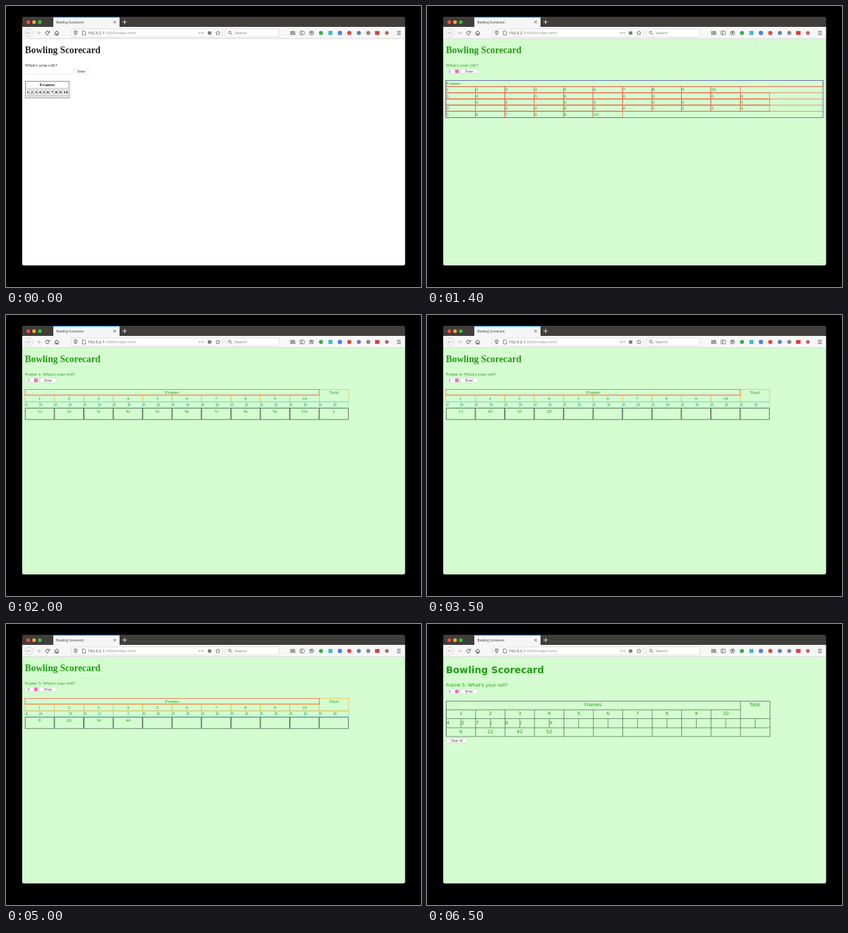
An HTML page with a canvas that plays this animation: 614 by 417 pixels, repeating every 8 s.

```html
<!DOCTYPE html>
<html lang="en">
<head>
<meta charset="utf-8">
<title>Bowling Scorecard</title>
<style>
html, body { margin: 0; width: 614px; height: 417px; overflow: hidden; background: #000; }
canvas { display: block; }
</style>
</head>
<body>
<canvas id="stage" width="614" height="417"></canvas>
<script>
const c = document.getElementById('stage').getContext('2d');
const SERIF = '"Liberation Serif", Times, serif';
const WIDE = '"DejaVu Sans", Verdana, sans-serif';
const UI = '"Open Sans", sans-serif';
const GREEN = '#239b12', MINT = '#d4fcd0', RED = '#f0604a', ORANGE = '#f0bd48', CYAN = '#83dfd9', DARK = '#56705a';
const LEFT = 28, COL = 43.54;
const colX = i => LEFT + i * COL;

function rect(x, y, w, h, fill) {
  c.fillStyle = fill;
  c.fillRect(x, y, w, h);
}
function box(x, y, w, h, color, width = 0.8) {
  c.strokeStyle = color;
  c.lineWidth = width;
  c.strokeRect(x, y, w, h);
}
function round(x, y, w, h, r, fill, stroke) {
  c.beginPath();
  c.roundRect(x, y, w, h, r);
  if (fill) { c.fillStyle = fill; c.fill(); }
  if (stroke) { c.strokeStyle = stroke; c.lineWidth = 0.7; c.stroke(); }
}
function dot(x, y, r, fill) {
  c.beginPath();
  c.arc(x, y, r, 0, 7);
  c.fillStyle = fill;
  c.fill();
}
function ring(x, y, r, color, width = 0.9, from = 0, to = 7) {
  c.beginPath();
  c.arc(x, y, r, from, to);
  c.strokeStyle = color;
  c.lineWidth = width;
  c.stroke();
}
function line(color, width, ...p) {
  c.beginPath();
  for (let i = 0; i < p.length; i += 2) c.lineTo(p[i], p[i + 1]);
  c.strokeStyle = color;
  c.lineWidth = width;
  c.stroke();
}
function text(s, x, y, font, color, align = 'left') {
  c.font = font;
  c.fillStyle = color;
  c.textAlign = align;
  c.fillText(s, x, y);
}

function drawTabs() {
  rect(24, 16, 567, 15, '#403e3b');
  ['#fb4c42', '#f5ad30', '#35c13c'].forEach((k, i) => dot(33 + i * 8.5, 24, 2.7, k));
  rect(70, 16, 98, 15, '#f6f6f7');
  rect(70, 16, 98, 1.3, '#2d8df5');
  text('Bowling Scorecard', 74.5, 25.7, '4.7px ' + UI, '#333');
  line('#444', 0.8, 158.8, 22, 162.6, 25.8);
  line('#444', 0.8, 162.6, 22, 158.8, 25.8);
  line('#ddd', 1, 172.3, 23.8, 178.7, 23.8);
  line('#ddd', 1, 175.5, 20.6, 175.5, 27);
}

function drawToolbar() {
  const ink = '#555';
  rect(24, 31, 567, 18, '#f7f7f8');
  rect(24, 48, 567, 0.8, '#d2d2d4');
  ring(34, 40, 5.8, '#c8c8ca', 0.7);
  line('#bbb', 0.9, 33.7, 37.5, 31.2, 40, 33.7, 42.5);
  line('#bbb', 0.9, 31.2, 40, 37, 40);
  line('#bbb', 0.9, 48.3, 37.5, 50.8, 40, 48.3, 42.5);
  line('#bbb', 0.9, 45, 40, 50.8, 40);
  ring(61.3, 40, 2.6, ink, 1, 0.5, 5.5);
  line(ink, 1, 64.4, 36.8, 64.4, 39.3, 61.8, 39.3);
  line(ink, 1, 71.7, 40.2, 75, 37, 78.3, 40.2);
  line(ink, 1, 72.8, 39.7, 72.8, 43, 77.2, 43, 77.2, 39.7);
  rect(74.3, 41, 1.5, 2, ink);

  round(97, 34, 223, 12, 1.5, '#fff', '#d0d0d2');
  line(ink, 0.8, 100.7, 37.4, 103, 36.8, 105.3, 37.4, 105, 41, 103, 43, 101, 41, 100.7, 37.4);
  line(ink, 0.8, 103, 37, 103, 42.6);
  line(ink, 0.8, 113, 37, 116, 37, 117.7, 38.7, 117.7, 43, 113, 43, 113, 37);
  text('192.0.2.1', 121, 42.2, '5.9px ' + UI, '#333');
  const hostEnd = 121 + c.measureText('192.0.2.1').width;
  text(':4300/index.html', hostEnd, 42.2, '5.9px ' + UI, '#8c8c8c');
  [286.3, 289.2, 292.1].forEach(x => dot(x, 40, 0.75, ink));
  rect(298.7, 37.7, 5, 4.8, '#777');
  c.beginPath();
  for (let i = 0; i < 10; i++) {
    const a = i * Math.PI / 5 - Math.PI / 2, r = i % 2 ? 1.6 : 3.5;
    c.lineTo(313.5 + r * Math.cos(a), 40.2 + r * Math.sin(a));
  }
  c.closePath();
  c.strokeStyle = ink;
  c.lineWidth = 0.7;
  c.stroke();

  round(325, 34, 79, 12, 1.5, '#fff', '#d0d0d2');
  ring(331, 39.3, 1.9, ink, 0.8);
  line(ink, 0.8, 332.4, 40.7, 334.8, 43);
  text('Search', 338, 42.2, '5.9px ' + UI, '#777');

  [421.5, 423.4, 425.3].forEach(x => line(ink, 1, x, 37, x, 43));
  line(ink, 1, 426.2, 37.2, 427.8, 43);
  round(435, 37.2, 6.3, 5.6, 1, null, ink);
  line(ink, 0.8, 437.4, 37.2, 437.4, 42.8);
  ring(452, 40, 2.9, ink);
  dot(452, 39.4, 1.2, ink);
  dot(466, 40, 3, '#35ae4d');
  rect(477, 37, 6, 6, '#43bfc3');
  dot(494, 40, 3.2, '#4a83ee');
  dot(508, 40, 3.1, '#df4940');
  dot(522, 40, 3, '#5c82b5');
  dot(536, 40, 3, '#88888a');
  rect(546, 37.2, 6.6, 5.6, '#d83c3c');
  dot(563.5, 40, 2.8, '#b9675d');
  [37.6, 40, 42.4].forEach(y => line(ink, 0.9, 578.5, y, 584, y));
}

function button(label, x, y, w) {
  round(x, y, w, 6.6, 1, '#fff', '#c6d8c4');
  text(label, x + w / 2, y + 5, '4.7px ' + UI, '#333', 'center');
}

function drawForm(y, roundStep) {
  round(29, y, 19, 6.6, 1, '#fff', '#c6d8c4');
  text('0', 32, y + 5, '4.7px ' + UI, '#333');
  if (roundStep) dot(44.2, y + 3.3, 2.7, '#ee46b2');
  else round(41.7, y + 0.8, 5, 5, 0.8, '#ee46b2');
  line('#fff', 0.6, 43.2, y + 2.7, 44.2, y + 1.8, 45.2, y + 2.7);
  line('#fff', 0.6, 43.2, y + 4, 44.2, y + 4.9, 45.2, y + 4);
  button('Enter', 50, y, 25);
}

function drawPage(bg, color, prompt, family = SERIF, drop = 0) {
  rect(24, 48.8, 567, 337, bg);
  text('Bowling Scorecard', LEFT, 70 + drop, 'bold 13.86px ' + family, color);
  text(prompt, LEFT, 90 + drop, '6.93px ' + family, color);
}

function plainScene() {
  const bold = 'bold 6.93px ' + SERIF, ink = '#222';
  drawPage('#fff', ink, "What's your roll?");
  line('#e2e2e2', 0.7, 28, 101.3, 98, 101.3);
  round(99, 93.8, 25, 7, 1, '#fff', '#e6e6e6');
  text('Enter', 111.5, 98.8, '4.7px ' + UI, ink, 'center');
  box(28.4, 111.4, 65.6, 25.4, '#999');
  box(29.7, 112.7, 63, 9.3, '#aaa', 0.6);
  text('Frames', 61, 119.4, bold, ink, 'center');
  for (let i = 0; i < 10; i++) {
    const x = 29.7 + i * 6.03, w = i < 9 ? 5 : 8.7;
    box(x, 123.2, w, 9.3, '#aaa', 0.6);
    text(i + 1, x + w / 2, 130.2, bold, ink, 'center');
    box(x, 133.8, w, 1.6, '#aaa', 0.6);
  }
}

function flowScene() {
  const font = '6.93px ' + SERIF, top = 110.5, rowH = 9.15;
  drawPage(MINT, GREEN, "What's your roll?");
  drawForm(93.7);
  const put = (s, col, row) => {
    box(colX(col), top + row * rowH, COL, rowH, RED, 0.75);
    text(s, colX(col) + 0.6, top + row * rowH + 6.8, font, GREEN);
  };
  box(LEFT, top, 558, rowH, RED, 0.75);
  text('Frames', LEFT + 0.6, top + 6.8, font, GREEN);
  for (let i = 0; i < 10; i++) put(i + 1, i, 1);
  for (let i = 0; i < 39; i++) {
    const s = i > 28 ? i - 28 : i % 3 == 2 && i < 26 ? '' : 0;
    put(s, i % 11, 2 + Math.floor(i / 11));
  }
  for (let r = 1; r < 6; r++) line(RED, 0.75, LEFT, top + r * rowH, 586, top + r * rowH);
  box(LEFT, top, 558, 55.2, '#6068b8', 0.9);
}

// Rolls are two marks per frame; an underscore is an empty half.
function gridScene(frame, rolls, scores) {
  const font = '6.93px ' + SERIF;
  drawPage(MINT, GREEN, `Frame ${frame}: What's your roll?`);
  drawForm(93.7);
  for (let i = 0; i < 11; i++) {
    const x = colX(i), mid = x + COL / 2;
    if (i < 10) {
      box(x, 119.2, COL, 9.4, ORANGE);
      text(i + 1, mid, 126.1, font, GREEN, 'center');
    }
    for (let h = 0; h < 2; h++) {
      const hx = x + h * COL / 2, mark = rolls[i * 2 + h] || '0';
      box(hx, 129.2, COL / 2, 8, CYAN, 0.7);
      if (mark != '_') text(mark, hx + 0.4, 135.3, font, GREEN);
    }
    box(x + 0.4, 138.3, COL - 0.8, 16.8, DARK, 0.9);
    text(scores[i] ?? '', mid, 144.5, font, GREEN, 'center');
  }
  box(colX(10), 110.4, COL, 18.2, ORANGE);
  text('Total', colX(10.5), 116.9, font, GREEN, 'center');
  box(LEFT, 110.4, COL * 10, 8.4, RED);
  text('Frames', colX(5), 116.9, font, GREEN, 'center');
}

function finalScene() {
  const font = '6.93px ' + WIDE, rolls = '427/6/_X', scores = [6, 22, 42, 52];
  drawPage(MINT, GREEN, "Frame 5: What's your roll?", WIDE, 2.6);
  drawForm(96.8, true);
  box(28.4, 114.4, COL * 11, 52.6, DARK);
  [127.3, 140.4, 154].forEach((y, i) =>
    line(DARK, 0.8, 28.4, y, colX(i ? 11 : 10) + 0.4, y));
  text('Frames', colX(5), 122.2, font, GREEN, 'center');
  text('Total', colX(10.5), 122.2, font, GREEN, 'center');
  for (let i = 0; i < 11; i++) {
    const x = colX(i) + 0.4, mid = x + COL / 2;
    line(DARK, 0.8, x, i == 10 ? 114.4 : 127.3, x, 167);
    line(DARK, 0.8, mid, 141, mid, 153.4);
    if (i < 10) text(i + 1, mid, 135.3, font, GREEN, 'center');
    for (let h = 0; h < 2; h++) {
      const mark = rolls[i * 2 + h] || '_';
      if (mark != '_') text(mark, x + h * COL / 2 + 0.3, 148.6, font, GREEN);
    }
    text(scores[i] ?? '', mid, 161.8, font, GREEN, 'center');
  }
  button('Clear All', 28.4, 169.8, 31);
}

const scenes = [
  plainScene,
  flowScene,
  () => gridScene(1, '', [...Array.from({ length: 10 }, (_, i) => i + 1 + 's'), 's']),
  () => gridScene(4, '', [13, 20, 25, 28]),
  () => gridScene(5, '44_X62_/', [8, 26, 34, 44]),
  finalScene
];

function draw() {
  const t = performance.now() % 8000;
  rect(0, 0, 614, 417, '#000');
  c.save();
  c.beginPath();
  c.roundRect(23.7, 16, 566.8, 369, 3);
  c.clip();
  scenes[Math.floor((t + 1000) / 1500)]();
  drawTabs();
  drawToolbar();
  c.restore();
  requestAnimationFrame(draw);
}
draw();
</script>
</body>
</html>
```
